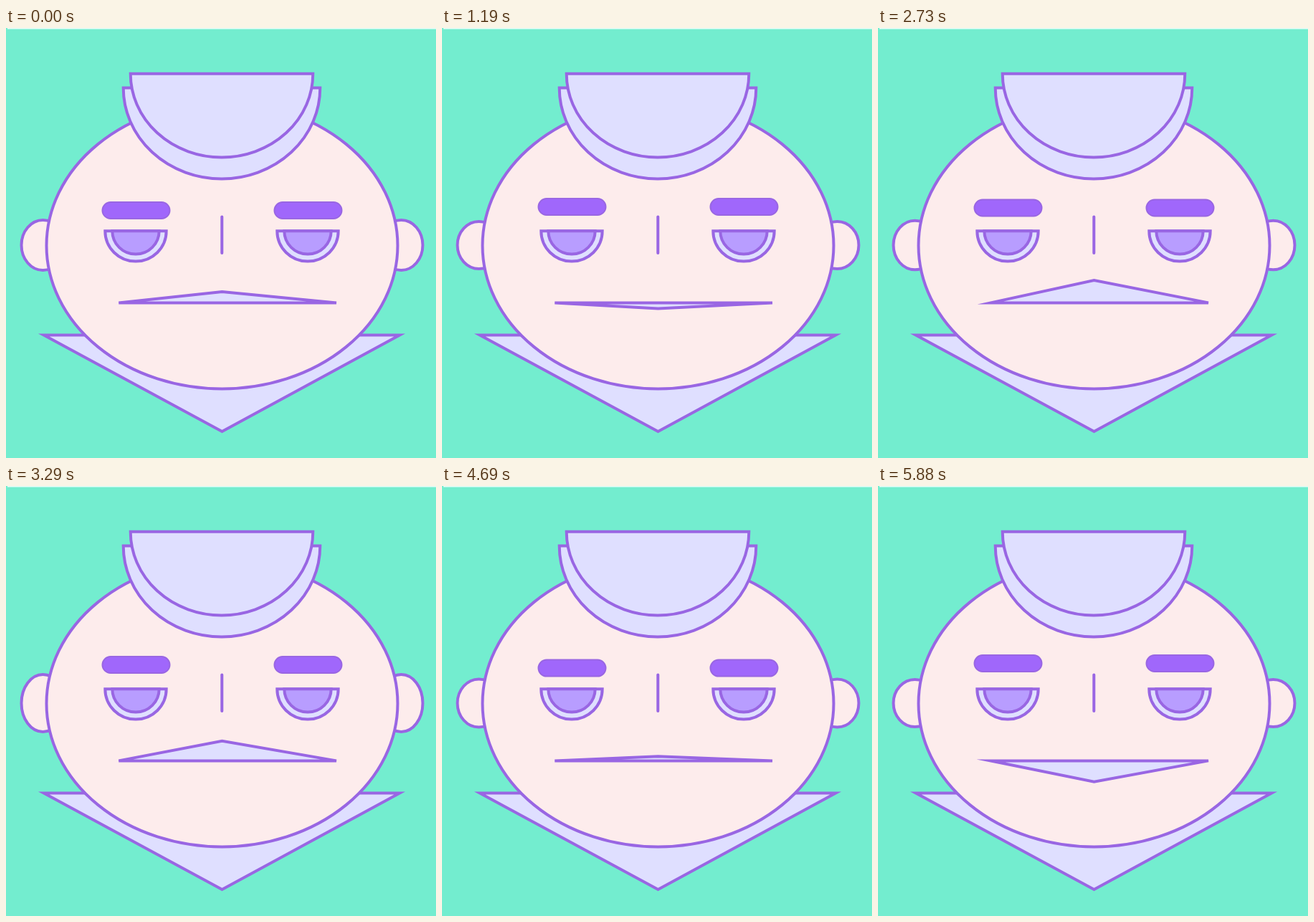
Write an HTML page with a canvas that moves like this. It is 600x600 px and loops after 5.95 s.

```html
<!DOCTYPE html>
<html lang="en">
<head>
<meta charset="utf-8">
<title>Grumpy face</title>
<style>
  html, body { margin: 0; width: 100%; height: 100%; overflow: hidden; background: #73edcf; }
  canvas { display: block; width: 600px; height: 600px; }
</style>
</head>
<body>
<canvas id="stage" width="600" height="600"></canvas>
<script>
const ctx = document.getElementById('stage').getContext('2d');
const LOOP = 5950, STEP = 70, CX = 301;
const BACK = '#73edcf', LINE = '#9966e3', LILAC = '#dfdfff', SKIN = '#fdecec',
      BROW = '#a067fb', PUPIL = '#b89dff';

// Key poses, about one a second; the face swings once between neighbours.
const poses = [
  { at: 0,    ear: 35,   brow: 254.5, mouth: -15.5 },
  { at: 1190, ear: 33,   brow: 249.5, mouth: 8 },
  { at: 2170, ear: 28.5, brow: 252.5, mouth: -35 },
  { at: 3290, ear: 40,   brow: 249.5, mouth: -27.5 },
  { at: 4270, ear: 34.5, brow: 255.8, mouth: -17.5 },
  { at: 5320, ear: 25,   brow: 247.5, mouth: -15.5 },
  { at: 5880, ear: 33,   brow: 247.5, mouth: 29.3 }
];
const swing = { ear: 4, brow: 2, mouth: 18 };

function poseAt(t) {
  const next = Math.max(1, poses.findIndex(p => p.at >= t));
  const a = poses[next - 1], b = poses[next];
  const p = (t - a.at) / (b.at - a.at);
  const ease = (1 - Math.cos(Math.PI * p)) / 2;
  const mix = key => a[key] + (b[key] - a[key]) * ease + swing[key] * Math.sin(2 * Math.PI * p);
  return { ear: mix('ear'), brow: mix('brow'), mouth: mix('mouth') };
}

function paint(fill, width = 4) {
  ctx.fillStyle = fill;
  ctx.lineWidth = width;
  ctx.fill();
  ctx.stroke();
}

function ellipse(x, y, rx, ry, fill) {
  ctx.beginPath();
  ctx.ellipse(x, y, rx, ry, 0, 0, 2 * Math.PI);
  paint(fill);
}

function bowl(x, y, rx, ry, fill) {
  ctx.beginPath();
  ctx.ellipse(x, y, rx, ry, 0, 0, Math.PI);
  ctx.closePath();
  paint(fill);
}

function triangle(left, right, y, tip) {
  ctx.beginPath();
  ctx.moveTo(left, y);
  ctx.lineTo(right, y);
  ctx.lineTo(CX + 0.5, tip);
  ctx.closePath();
  paint(LILAC);
}

function eye(x, browY) {
  bowl(x, 283.3, 42.7, 42.3, LILAC);
  bowl(x, 283.3, 32.7, 32.3, PUPIL);
  ctx.beginPath();
  ctx.roundRect(x - 46.5, browY - 11.5, 94, 23, 11.5);
  paint(BROW, 2);
}

function draw(t) {
  const { ear, brow, mouth } = poseAt(t);
  ctx.fillStyle = BACK;
  ctx.fillRect(0, 0, 600, 600);
  ctx.fillStyle = 'rgba(255,255,255,.85)';
  ctx.fillRect(2, 0, 598, 1.5);
  ctx.strokeStyle = LINE;
  ctx.lineCap = 'round';

  triangle(52.8, 549.3, 428.5, 563);
  for (const side of [-250, 250]) ellipse(CX + 0.5 + side, 303, 30, ear, SKIN);
  ellipse(CX + 0.5, 303.5, 245, 200, SKIN);
  bowl(CX, 83.5, 137.3, 127, LILAC);
  bowl(CX, 63.8, 127.3, 116.7, LILAC);
  for (const side of [-120, 120]) eye(CX + side, brow);
  triangle(157.3, 461, 383.4, 383.4 + mouth);

  ctx.beginPath();
  ctx.moveTo(CX + 0.3, 263.5);
  ctx.lineTo(CX + 0.3, 314);
  ctx.stroke();
}

function tick(now) {
  const t = now % LOOP;
  draw(Math.floor(t / STEP) * STEP);
  requestAnimationFrame(tick);
}
draw(0);
requestAnimationFrame(tick);
</script>
</body>
</html>
```
